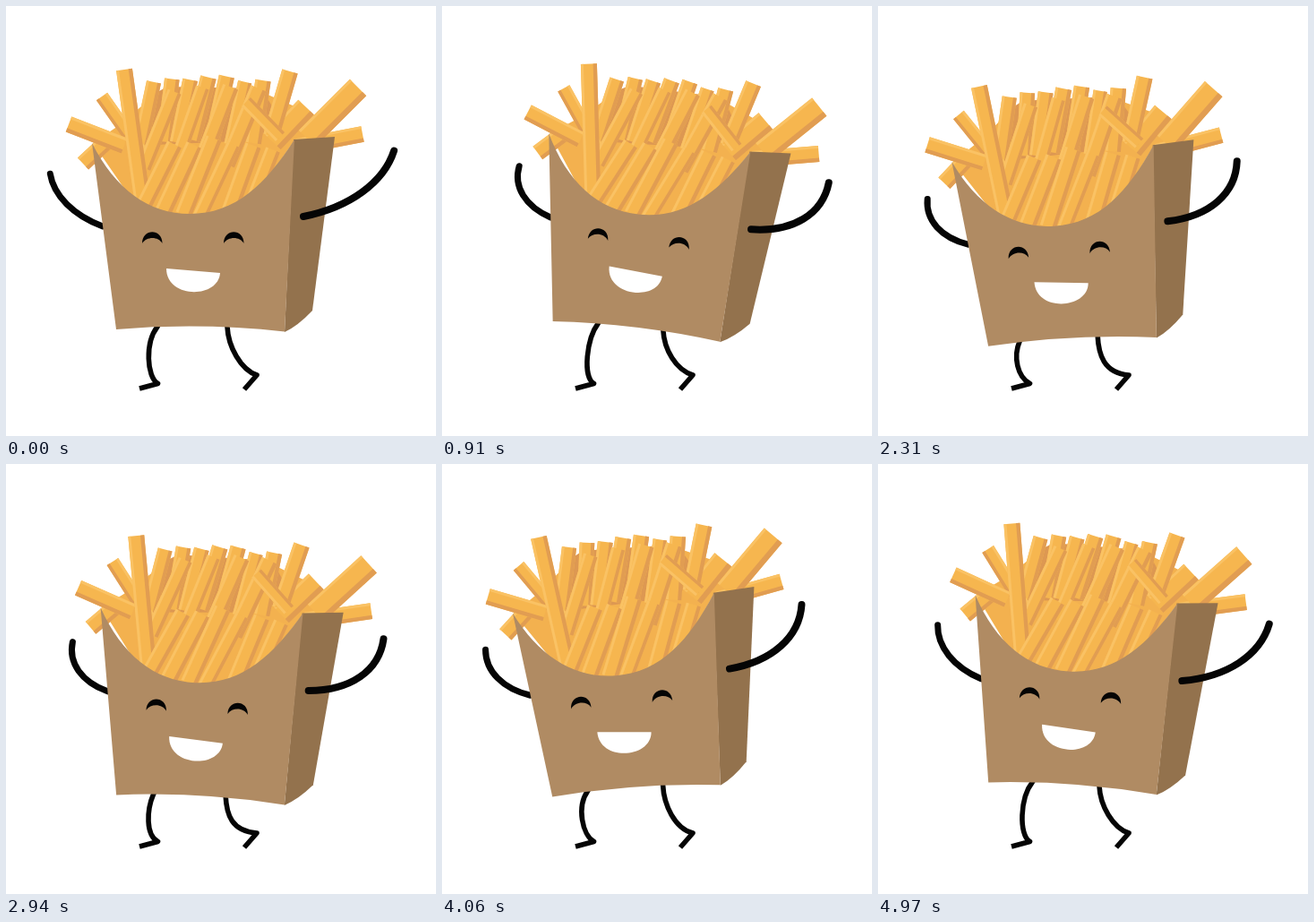
Recreate the animation shown at these times as an HTML page. Size 480x480 px, loop 5040 ms.

```html
<!DOCTYPE html>
<html lang="en">
<head>
<meta charset="utf-8">
<title>Dancing fries</title>
<style>
  html, body { margin: 0; width: 100%; height: 100%; overflow: hidden; background: #fff; }
  svg { display: block; width: 100vw; height: 100vh; }
  .limb { fill: none; stroke: #050505; stroke-linejoin: round; }
  .arm { stroke-linecap: round; }
</style>
</head>
<body>
<svg viewBox="0 0 480 480">
  <path id="legL" class="limb" stroke-width="5.6"/>
  <path id="legR" class="limb" stroke-width="5.6"/>
  <g id="body">
    <path id="armL" class="limb arm" stroke-width="7"/>
    <path fill="#f3b14f" d="M97 153L128 132L165 100L290 98L345 122L355 147L322 150L270 225L205 236L150 230Z"/>
    <path fill="#dd9852" d="M158 102L180 90L285 92L305 125L280 150L165 155Z"/>
    <g id="fries" fill="none"></g>
    <path fill="#93724d" d="M321 149L367 146L342 340Q326 357 311 364Z"/>
    <path fill="#b08b63" d="M96 153C122 205 160 232 205 232C256 232 290 199 322 149L311 363.5Q217 353 123 361Z"/>
    <path id="eye" fill="#050505" d="M152 265C152 248 174.500 248 174.500 265C170 257 157 257 152 265Z"/>
    <use href="#eye" x="91"/>
    <path fill="#fff" d="M179 293L239 298C237 327 179 327 179 293Z"/>
    <path id="armR" class="limb arm" stroke-width="8"/>
  </g>
</svg>
<script>
const STEP = 70, STEPS = 72;
const $ = id => document.getElementById(id);
const rad = deg => deg * Math.PI / 180;

let seed = 11;
const random = () => (seed = seed * 16807 % 2147483647) / 2147483647;
const jitter = size => (random() - .5) * size;

function stroke(x1, y1, x2, y2, width, color) {
  const line = document.createElementNS("http://www.w3.org/2000/svg", "path");
  line.setAttribute("d", `M${x1} ${y1}L${x2} ${y2}`);
  line.setAttribute("stroke", color);
  line.setAttribute("stroke-width", width);
  $("fries").append(line);
}

// fry from tip to root, lit on one long edge and shaded on the other
function fry(x1, y1, x2, y2, width = 18) {
  const len = Math.hypot(x2 - x1, y2 - y1), side = x1 < 120 ? -1 : 1;
  const nx = side * (y2 - y1) / len, ny = side * (x1 - x2) / len;
  const strip = (off, size, color) =>
    stroke(x1 + nx * off, y1 + ny * off, x2 + nx * off, y2 + ny * off, size, color);
  const shade = width * .24;
  strip(0, width, "#f6b64f");
  strip((width - shade) / 2, shade, "#e19d52");
  strip(1.5 - width / 2, 3, "#fac264");
}

// evenly spread fries with tips on a shallow arch
function row(count, left, right, top, length, lean) {
  for (let i = 0; i < count; i++) {
    const x = left + (right - left) * i / (count - 1);
    const y = top + .0015 * (x - 235) ** 2 + jitter(7);
    fry(x, y, x - lean + jitter(14), y + length, 17 + jitter(4));
  }
}

fry(86, 176, 114, 150);
fry(398, 143, 325, 157);
row(7, 165, 287, 81, 70, 14);
fry(335, 113, 298, 152, 24);
fry(393, 91, 336, 148, 26);
fry(317, 73, 296, 145);
fry(107, 101, 152, 165, 15);
fry(70, 132, 132, 156);
row(4, 188, 282, 92, 85, 34);
fry(268, 107, 306, 146, 14);
fry(132, 71, 152, 215);
row(6, 188, 298, 151, 85, 37);

// key points of the tilt: step, degrees
const TILT = [[0, 0], [13, 6.2], [22, .6], [28, -6.9], [33, -3.8],
  [42, 2.6], [50, 2.5], [58, -4.8], [61, -6.9], [71, 3.4]];

// smooth curve through key points
function curve(keys, k) {
  const last = keys.length - 1;
  const i = Math.max(0, keys.findLastIndex((key, j) => j < last && key[0] <= k));
  const slope = j => {
    const a = keys[Math.max(j - 1, 0)], b = keys[Math.min(j + 1, last)];
    return (b[1] - a[1]) / (b[0] - a[0]);
  };
  const [x0, y0] = keys[i], [x1, y1] = keys[i + 1];
  const h = x1 - x0, u = (k - x0) / h, v = 1 - u;
  return v * v * (1 + 2 * u) * y0 + u * u * (3 - 2 * u) * y1
    + h * u * v * (v * slope(i) - u * slope(i + 1));
}

// arm from a shoulder: dir is 1 for right, -1 for left
function arm(x, y, dir, angle, reach, bulge) {
  const c = Math.cos(rad(angle)), s = Math.sin(rad(angle));
  const at = (along, out) =>
    `${x + dir * (along * reach * c + out * s)} ${y - along * reach * s + out * c}`;
  return `M${at(0, 0)}C${at(.38, bulge)} ${at(.76, bulge)} ${at(1, 0)}`;
}

function pose(k) {
  const tilt = curve(TILT, k);
  const drop = 13.5 * ((1 - Math.cos(rad(5 * (k - 1.5)))) / 2) ** 1.7;
  const reach = 113 + 12 * Math.cos(rad(72 * k - 30 * Math.sin(rad(5 * k))));
  const bend = 125 - reach, bulge = 22 + bend * .2;
  $("body").setAttribute("transform", `translate(0 ${drop}) rotate(${tilt} 217 362)`);
  $("armR").setAttribute("d", arm(332, 235, 1, 36 + bend * .05, reach, bulge));
  $("armL").setAttribute("d", arm(108, 246, -1, 45 + bend * .31, reach * .664, bulge * .66));

  const lx = 169 + tilt - .55 * drop, ly = 358 + drop - .87 * tilt;
  $("legL").setAttribute("d", `M${lx + 4} ${ly - 8}L${lx} ${ly}
    C${lx - 14 + .5 * drop} ${ly + 18} ${157 - .1 * drop} 414 169.5 421.500L149 427`);
  const rx = 247 - .15 * drop, ry = 358 + drop * .85 + .4 * tilt;
  $("legR").setAttribute("d", `M${rx - 1} ${ry - 9}L${rx} ${ry}
    C${rx + 1} ${ry + 22} ${262 - .8 * drop} ${406 + .3 * drop} 280 412L266 428`);
}

const start = performance.now();
function tick() {
  pose(Math.floor(Math.max(0, performance.now() - start) / STEP) % STEPS);
  requestAnimationFrame(tick);
}
tick();
</script>
</body>
</html>
```
